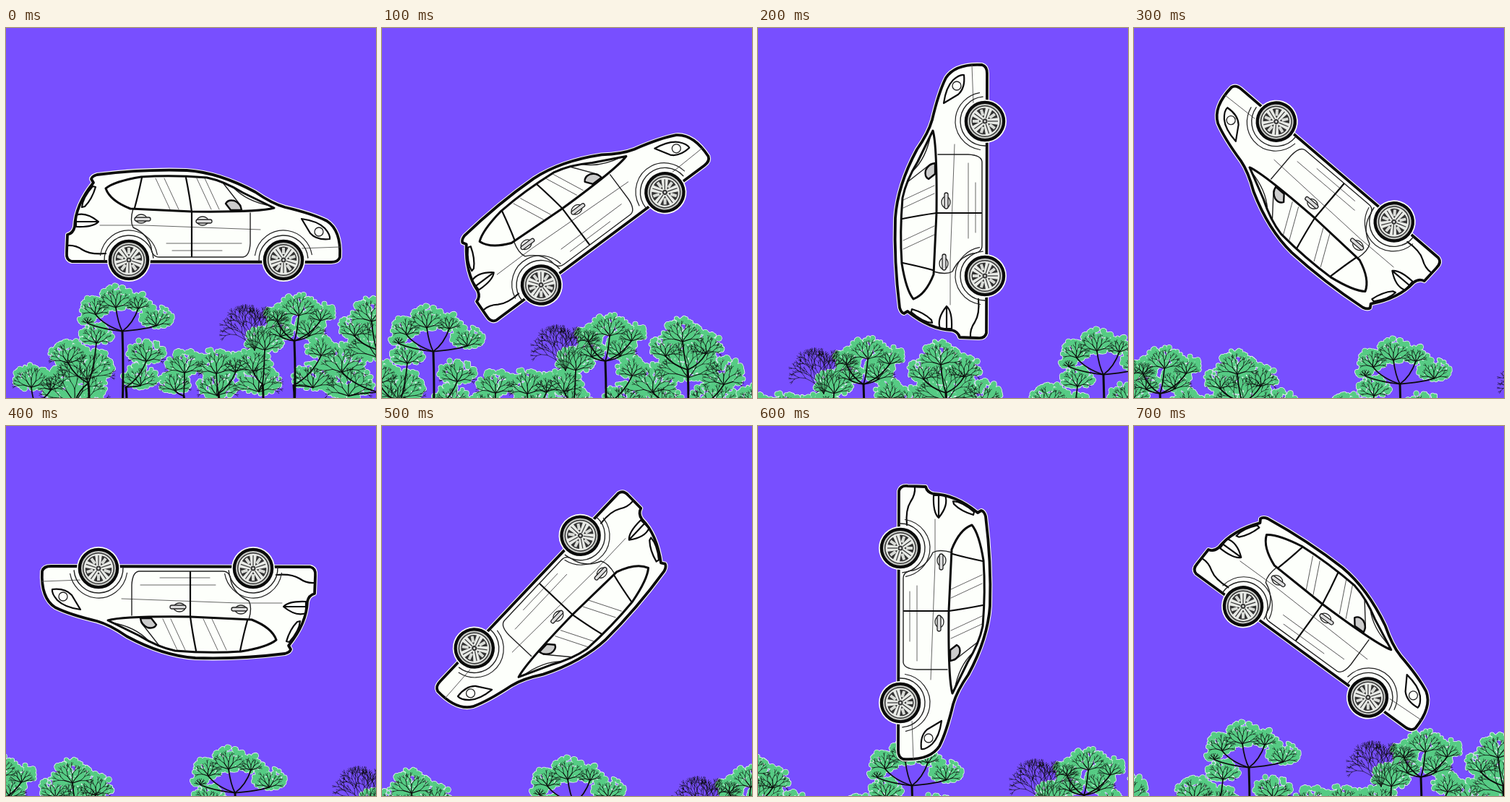
An HTML page with a canvas that plays this animation: 512 px wide and 512 px high, repeating every 0.8 s.

```html
<!DOCTYPE html>
<html lang="en">
<head>
<meta charset="utf-8">
<title>Tumbling car</title>
<style>
  html, body { margin: 0; height: 100%; overflow: hidden; background: #784fff; }
  canvas { display: block; width: 100vw; height: 100vh; }
</style>
</head>
<body>
<canvas id="stage" width="512" height="512"></canvas>
<script>
const SKY = '#784fff', LEAF = '#56cb84', INK = '#0b0b0b', GREY = '#333', PAPER = '#fdfffb';
const STEP = 100, TILE = 570, TAU = Math.PI * 2;
const ctx = document.getElementById('stage').getContext('2d');

// Car pivot x, y, counterclockwise degrees; tree offset x, y.
const poses = [
  [253, 260, 0, 0, 0],
  [250, 257, 36.8, -90, 28],
  [253, 260, 90, -253, 60],
  [257, 261, 139.6, -363, 73],
  [259, 258, 180, -414, 88],
  [262, 254, 226.7, -465, 102],
  [258, 252, 270, -518, 78],
  [254, 249, 323.9, -572, 53]
];

let seed = 7;
function rnd() {
  seed = (seed * 16807) % 2147483647;
  return seed / 2147483647;
}

function dot(g, x, y, r, color) {
  g.fillStyle = color;
  g.beginPath();
  g.arc(x, y, r, 0, TAU);
  g.fill();
}

// A tree is its foot x and its crowns as [x, y, radius].
const trees = [];
const tree = (foot, ...crowns) => trees.push({ foot, crowns });
tree(40, [35, 486, 25], [62, 492, 20]);
tree(114, [86, 452, 26], [125, 426, 22], [112, 470, 36], [95, 498, 44]);
tree(161, [152, 376, 24], [124, 387, 21], [183, 380, 18], [208, 402, 22], [113, 403, 12]);
tree(166, [194, 450, 25], [186, 484, 24]);
tree(246, [247, 466, 25], [234, 492, 22]);
tree(294, [291, 466, 27], [318, 466, 21], [292, 496, 28]);
tree(355, [358, 434, 26], [342, 464, 25], [350, 490, 30]);
tree(399, [405, 387, 25], [376, 398, 19], [435, 396, 20], [380, 418, 20], [420, 416, 22]);
tree(398, [425, 485, 28], [436, 444, 21]);
tree(513, [506, 394, 27], [482, 416, 22], [538, 412, 24], [514, 438, 40]);
tree(515, [465, 462, 32], [563, 452, 30], [474, 494, 34], [550, 488, 34]);

function curve(g, x, y, cx, cy, x2, y2, w) {
  g.lineWidth = w;
  g.beginPath();
  g.moveTo(x, y);
  g.quadraticCurveTo(cx, cy, x2, y2);
  g.stroke();
}

function twig(g, x, y, angle, len, w) {
  const dx = Math.cos(angle) * len, dy = Math.sin(angle) * len;
  curve(g, x, y, x + dx / 2 + (rnd() - .5) * 3, y + dy / 2, x + dx, y + dy, w);
  if (len < 4.5) return;
  for (const side of [-1, 1]) {
    const turn = side * (.2 + rnd() * .35);
    twig(g, x + dx, y + dy, angle + turn, len * (.6 + rnd() * .16), Math.max(.6, w * .72));
  }
}

function drawTrees() {
  const tile = document.createElement('canvas');
  tile.width = 610;
  tile.height = 530;
  const g = tile.getContext('2d');
  g.lineCap = 'round';
  g.strokeStyle = INK;

  const leaves = [];
  for (const [x, y, r] of trees.flatMap(t => t.crowns)) {
    for (let i = 0; i < r * r / 5; i++) {
      const a = rnd() * TAU, d = r * Math.sqrt(rnd()), s = Math.sin(a);
      leaves.push([x + Math.cos(a) * d, y + s * d * (s > 0 ? .55 : .8), 1.8 + rnd() * 2]);
    }
  }
  for (const [x, y, r] of leaves) dot(g, x, y, r + .8, '#e4f6ef');
  for (const [x, y, r] of leaves) dot(g, x, y, r, LEAF);

  // Bare twigs beside the middle tree.
  for (let i = -4; i < 3; i++) twig(g, 344, 446, i / 5 - 1.5, 18 + rnd() * 6, .7);

  for (const { foot, crowns } of trees) {
    const fork = 30 + crowns.reduce((sum, c) => sum + c[1], 0) / crowns.length;
    curve(g, foot, 530, foot + 2, (fork + 530) / 2, foot, fork, 3);
    for (const [x, y, r] of crowns) {
      const base = y + r * .45;
      curve(g, foot, fork, (foot + x * 2) / 3, (fork * 2 + base) / 3, x, base, 1.7);
      for (let i = 0; i < 5; i++) twig(g, x, base, -Math.PI * (.1 + i * .2), r * .42, 1.1);
    }
  }
  return tile;
}

const body = new Path2D(`M118 209 Q119 205 126 203 Q190 195 250 197 Q295 200 345 227
  Q368 243 386 248 Q424 257 444 267 Q464 280 462 317 Q460 324 450 324
  L91 323 Q83 321 84 311 L85 286 Q93 284 95 275 Q96 245 121 214 Z`);
const glass = new Path2D(`M138 222 Q150 212 187 206 Q230 203 278 207 Q302 212 328 228
  L371 249 Q350 255 257 254 L172 250 Q144 239 138 222 Z`);
const pillars = new Path2D('M188 207 Q183 231 178 249 M249 207 Q254 232 257 254 V316');
const doors = new Path2D(`M176 250 Q171 267 176 276 Q196 285 201 304 Q202 317 212 317
  H328 Q337 316 338 298 V256`);
const headlight = new Path2D('M409 264 Q431 267 441 277 Q449 286 448 292 Q430 294 421 284 Z');
const taillight = new Path2D('M97 259 Q111 254 128 268 Q121 276 97 275 Z M97 268 H127');
const rearWindow = new Path2D('M105 248 Q106 235 120 219 L124 220 Q119 237 109 247 Z');
const bumper = new Path2D('M85 301 Q96 300 106 307 Q117 314 138 312');
const creases = new Path2D('M130 273 H190 L352 279 M222 298 H326 M230 308 H299 M408 305 L462 303');
const frontGlass = new Path2D('M300 214 L325 246 M315 221 Q333 240 366 246');
const mirror = new Path2D('M304 243 Q307 237 316 239 Q325 243 326 252 H311 Z');

function stroke(path, width, color = INK) {
  ctx.lineWidth = width;
  ctx.strokeStyle = color;
  ctx.stroke(path);
}

function ring(x, y, rx, ry = rx, from = 0, to = TAU) {
  const path = new Path2D();
  path.ellipse(x, y, rx, ry, 0, from, to);
  return path;
}

function wheel(x, y) {
  stroke(ring(x, y, 40, 41, 3.3, 6.1), 1.2, '#222');
  stroke(ring(x, y, 34, 34, 3.1, 6.2), 1.4, '#222');
  dot(ctx, x, y, 30, PAPER);
  dot(ctx, x, y, 28.3, INK);
  dot(ctx, x, y, 24, '#c9cbc7');
  dot(ctx, x, y, 22, GREY);
  dot(ctx, x, y, 20.5, '#e8eae6');
  ctx.save();
  ctx.translate(x, y);
  for (let i = 0; i < 5; i++) {
    ctx.fillStyle = GREY;
    ctx.beginPath();
    ctx.moveTo(0, -5);
    ctx.lineTo(-6.5, -17);
    ctx.quadraticCurveTo(0, -20, 6.5, -17);
    ctx.fill();
    ctx.fillStyle = '#d9dbd7';
    ctx.fillRect(-2, -17, 4, 9);
    ctx.rotate(TAU / 10);
    ctx.fillStyle = GREY;
    ctx.fillRect(-.6, -18, 1.2, 14);
    ctx.rotate(TAU / 10);
  }
  ctx.restore();
  dot(ctx, x, y, 3.5, GREY);
  dot(ctx, x, y, 1.5, '#ddd');
}

function handle(x, y) {
  stroke(ring(x, y, 8, 6), 1.3, '#222');
  const grip = new Path2D();
  grip.roundRect(x - 9, y - 2, 22, 5, 2.5);
  ctx.fillStyle = '#ddd';
  ctx.fill(grip);
  stroke(grip, 1.3, '#222');
}

function drawCar(x, y, deg) {
  ctx.save();
  ctx.translate(x, y);
  ctx.rotate(-deg * TAU / 360);
  ctx.translate(-253, -260);
  ctx.lineJoin = ctx.lineCap = 'round';
  stroke(body, 6, PAPER);
  ctx.fillStyle = PAPER;
  ctx.fill(body);
  stroke(body, 3.8);

  stroke(creases, .9, '#555');
  for (const left of [207, 219, 264, 275]) {
    stroke(new Path2D(`M${left} 208 l20 43`), .9, '#555');
  }
  stroke(doors, 1.4, '#222');
  stroke(frontGlass, 1.4, '#222');
  for (const part of [pillars, headlight, taillight, rearWindow, bumper]) stroke(part, 2.2);
  stroke(glass, 3);
  ctx.fillStyle = '#ccc';
  ctx.fill(mirror);
  stroke(mirror, 2.4);
  stroke(ring(433, 282, 6), 1.3, '#222');
  handle(187, 264);
  handle(272, 267);
  wheel(170, 321);
  wheel(384, 321);
  ctx.restore();
}

const tile = drawTrees();

function frame(now) {
  const [x, y, deg, dx, dy] = poses[Math.floor(now / STEP) % poses.length];
  ctx.fillStyle = SKY;
  ctx.fillRect(0, 0, 512, 512);
  ctx.drawImage(tile, dx, dy);
  ctx.drawImage(tile, dx + TILE, dy);
  drawCar(x, y, deg);
}

let start;
function tick(now) {
  start ??= now;
  frame(Math.max(0, now - start));
  requestAnimationFrame(tick);
}
frame(0);
requestAnimationFrame(tick);
</script>
</body>
</html>
```
